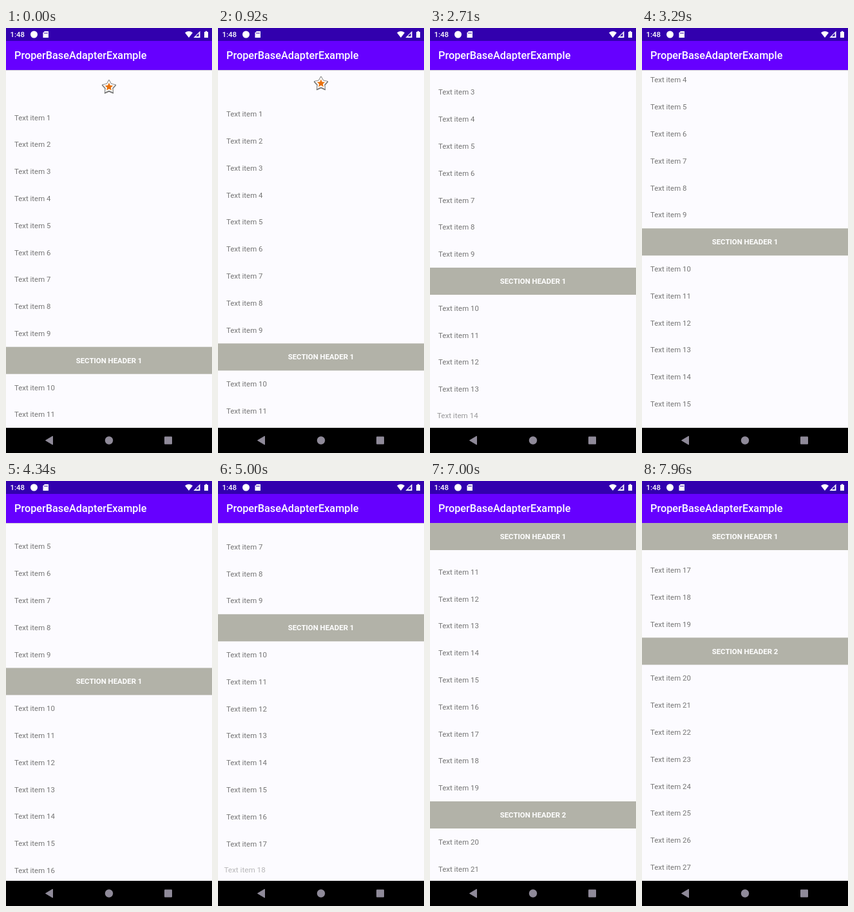
An HTML page for the animation above (8 s loop, 320x658 px).

```html
<!DOCTYPE html>
<html lang="en">
<meta charset="utf-8">
<title>List with section headers</title>
<style>
  html, body { margin: 0; width: 100%; height: 100%; overflow: hidden; background: #000; }
  body { position: relative; font-family: Roboto, sans-serif; }
  #top { position: absolute; inset: 0 0 auto; height: 65px; background: linear-gradient(#3200ae 20px, #6600ff 20px); box-shadow: 0 1px 1px rgba(0,0,0,.15); color: #fff; }
  #clock { position: absolute; left: 6.5px; top: 3px; font: 500 11.43px/14px Roboto, sans-serif; }
  #title { position: absolute; left: 13.04px; top: 33.4px; font: 500 16.3px/20px Roboto, sans-serif; white-space: nowrap; }
  #list { position: absolute; top: 65px; left: 0; width: 320px; height: 554px; overflow: hidden; background: #fcfbff; }
  .row { position: absolute; top: 0; left: 0; width: 320px; height: 41.8px; box-sizing: border-box; padding-left: 13.04px; font-size: 11.43px; line-height: 43.4px; color: #757575; transform-origin: 160px 70px; }
  .head { z-index: 1; padding: 0; background: #b2b2a8; color: #fff; font-weight: 700; text-align: center; }
  svg { position: absolute; left: 0; top: 0; }
</style>
<body>
<div id="list"></div>
<div id="top"><span id="clock">1:48</span><span id="title">ProperBaseAdapterExample</span></div>
<svg width="320" height="658">
  <g fill="#fff">
    <circle cx="43.5" cy="10" r="5.5"/>
    <path d="M60 5h6v10h-8.5V7.5z"/>
    <path d="M278 7.2q6-4.6 12 0L284 15z"/>
    <path d="M301.5 4.8V15H291.3z"/>
    <path d="M308 6h1.7V4.8h2.6V6h1.7v9h-6z"/>
  </g>
  <path d="M60 7v2M62 7v2M64 7v2" stroke="#3200ae"/>
  <path d="M299.5 8v5h-4.5z" fill="#3200ae"/>
  <g fill="#8f8a99">
    <path d="M61.5 638.5L72.5 632v13z" stroke="#8f8a99" stroke-linejoin="round"/>
    <circle cx="160" cy="638.5" r="6.2"/>
    <rect x="246" y="632.5" width="12" height="12" rx="1"/>
  </g>
</svg>
<script>
const LOOP = 8000, ROW = 41.8, FIRST = 52.5, VIEW = 554, FADE = 300;
// scroll offset keys: time in ms, pixels
const keys = [[0, 0], [1640, 9], [1710, 9], [2000, 16], [2710, 122.5], [2900, 154], [3710, 198],
  [3880, 198], [4340, 204.3], [4460, 204.3], [5540, 416.5], [5700, 441], [6340, 457],
  [6840, 457], [7000, 457.5], [7650, 672], [7960, 711], [LOOP, 711]];

const slope = i => (keys[i + 1][1] - keys[i][1]) / (keys[i + 1][0] - keys[i][0]);
const tangents = keys.map((_, i) => {
  if (!i || i === keys.length - 1) return 0;
  const a = slope(i - 1), b = slope(i);
  return a * b > 0 ? 2 * a * b / (a + b) : 0;
});

// monotone cubic through the keys
function scrollAt(t) {
  let i = 0;
  while (i < keys.length - 2 && t >= keys[i + 1][0]) i++;
  const [t0, a] = keys[i], [t1, b] = keys[i + 1], d = t1 - t0, u = (t - t0) / d, v = 1 - u;
  return a * v * v * (1 + 2 * u) + b * u * u * (3 - 2 * u)
    + d * u * v * (tangents[i] * v - tangents[i + 1] * u);
}

function entryTime(top) {
  if (top < VIEW) return -FADE;
  for (let t = 0; t < LOOP; t += 5) if (top - scrollAt(t) < VIEW) return t;
  return LOOP;
}

const list = document.getElementById('list'), rows = [];
function addRow(html, top, head) {
  const el = document.createElement('div');
  el.className = head ? 'row head' : 'row';
  el.innerHTML = html;
  list.append(el);
  rows.push({ el, top, head, enter: entryTime(top) });
}

function star(r, inner) {
  return Array.from({ length: 10 }, (_, i) => {
    const a = i * Math.PI / 5, q = i % 2 ? inner : r;
    return (160 + q * Math.sin(a)).toFixed(2) + ',' + (26.2 - q * Math.cos(a)).toFixed(2);
  }).join(' ');
}
addRow(`<svg width="320" height="53" stroke-linejoin="round">
  <polygon points="${star(11, 6)}" transform="translate(0 .8)" fill="#555" stroke="#666" stroke-width="1.4"/>
  <polygon points="${star(11, 6)}" fill="#fff" stroke="#8a8a8a"/>
  <polygon points="${star(6.6, 3)}" fill="#e8700c"/></svg>`, 0);
let nextTop = FIRST;
for (let n = 1; n <= 29; n++, nextTop += ROW) {
  if (n % 10 === 0) {
    addRow('SECTION HEADER ' + n / 10, nextTop, true);
    nextTop += ROW;
  }
  addRow('Text item ' + n, nextTop);
}
const heads = rows.filter(r => r.head);

function draw(now) {
  const t = now % LOOP, s = scrollAt(t);
  for (const r of rows) {
    let y = r.top - s;
    if (r.head) {
      const next = heads[heads.indexOf(r) + 1];
      y = Math.max(y, 0);
      if (next) y = Math.min(y, next.top - s - ROW);
    }
    const p = Math.max(0, Math.min(1, (t - r.enter) / FADE));
    r.el.style.opacity = p;
    r.el.style.transform = `translateY(${y.toFixed(2)}px) scale(${1 + .05 * (1 - p)})`;
  }
  requestAnimationFrame(draw);
}
draw(0);
</script>
</body>
</html>
```
